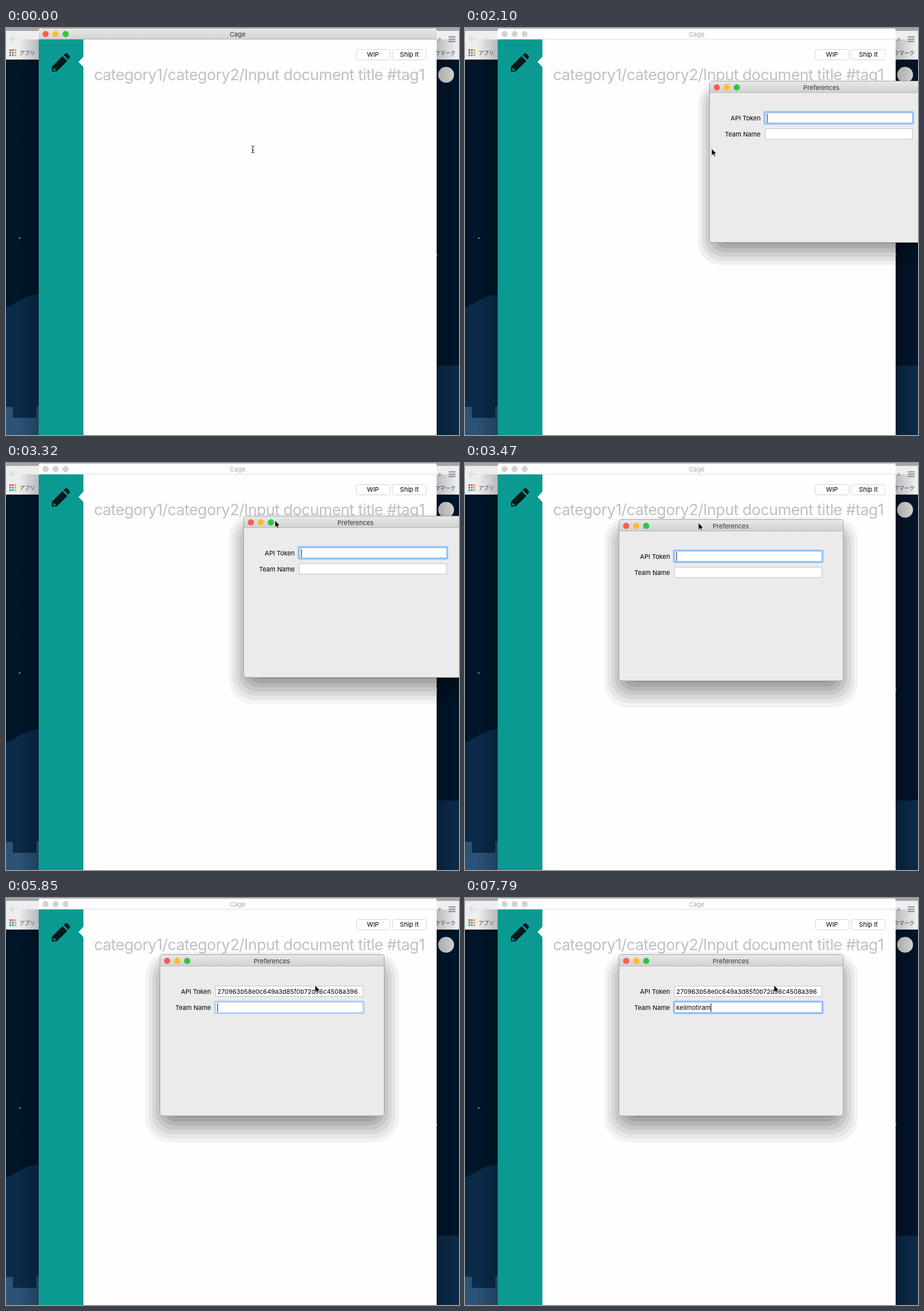
Animation, 790 px wide and 709 px high, one loop 8000 ms. Source, as an HTML page:

```html
<!DOCTYPE html>
<html lang="en">
<head>
<meta charset="utf-8">
<title>Preferences</title>
<style>
  html, body { margin: 0; width: 100%; height: 100%; overflow: hidden; background: #001529; }
  svg { display: block; font: 11px Inter, sans-serif; font-optical-sizing: none; }
  text { white-space: pre; }
  .mid { text-anchor: middle; }
  .end { text-anchor: end; }
  .cjk { font: 9px "Noto Sans CJK JP", "Noto Sans CJK", sans-serif; fill: #444; }
</style>
</head>
<body>
<svg id="stage" width="790" height="709" viewBox="0 0 790 709">
  <defs>
    <linearGradient id="bar" x2="0" y2="1"><stop stop-color="#e8e8e8"/><stop offset="1" stop-color="#d1d1d1"/></linearGradient>
    <linearGradient id="shade"><stop stop-opacity="0"/><stop offset="1" stop-opacity=".22"/></linearGradient>
  </defs>

  <!-- browser behind -->
  <rect width="790" height="709" fill="#001529"/>
  <path d="M0 487C20 479 34 464 57 464V709H0Z" fill="#0a2a48"/>
  <path d="M0 660H12V679H53V659H57V709H0Z" fill="#2b5277"/>
  <path d="M750 588H790V709H750Z" fill="#0a2a48"/>
  <path d="M750 588H790V709H750Z" fill="#0a2a48"/>
  <circle cx="24" cy="366" r="1.2" fill="#a9b4bd"/>
  <circle cx="751" cy="395" r="1.5" fill="#a9b4bd"/>
  <rect width="790" height="55" fill="#eceef0"/>
  <rect width="790" height="5" fill="#a5a5a7"/>
  <g fill="none" stroke="#d9dadc" stroke-width="2">
    <path d="M20 19.5H8M13 14L7.500 19.500L13 25"/>
    <path d="M30 19.500H42M37 14L42.500 19.500L37 25" stroke="#e4e5e7"/>
    <path d="M772 15.500H784M772 19.500H784M772 23.500H784" stroke="#8b8b8d"/>
  </g>
  <g id="apps"></g>
  <text class="cjk" x="23.500" y="46.500">アプリ</text>
  <text class="cjk end" x="784" y="46.500">ブックマーク</text>
  <text x="753" y="23" fill="#8b8b8d">»</text>
  <circle cx="767.500" cy="81.500" r="13.800" fill="#d6d6d6"/>
  <rect x="22" y="20" width="35" height="689" fill="url(#shade)"/>
  <rect x="-786" y="20" width="35" height="689" fill="url(#shade)" transform="scale(-1 1)"/>

  <!-- editor window -->
  <path d="M57 709V5Q57 0 62 0H746Q751 0 751 5V709Z" fill="#fefefe"/>
  <g id="active">
    <path d="M57 20V5Q57 1 61 1H747Q751 1 751 5V20Z" fill="url(#bar)"/>
  </g>
  <path d="M61 .5H747" stroke="#a0a0a2"/>
  <path id="rule" d="M57 19.500H751"/>
  <g id="mainLights"></g>
  <text id="mainTitle" class="mid" x="404" y="15">Cage</text>
  <rect x="57" y="20" width="78" height="689" fill="#0b9a91"/>
  <path d="M135 50V68L126.500 59Z" fill="#fefefe"/>
  <path d="M80 76V67.500L98.500 49L107 57.500L88.500 75.500ZM100.500 47L103.500 44.500Q105.500 43 107.500 45L110.500 48Q112.500 50 111 52L108.500 55Z" fill="#07191c"/>
  <path d="M82.500 70L84.500 69.500V72H87L86.500 74H82.500Z" fill="#0b9a91"/>
  <g fill="#fff" stroke="#d2d2d2">
    <rect x="611" y="37.500" width="59" height="18" rx="3.500"/>
    <rect x="674" y="37.500" width="59" height="18" rx="3.500"/>
  </g>
  <text class="mid" x="640" y="50">WIP</text>
  <text class="mid" x="703.500" y="50">Ship It</text>
  <text x="153.500" y="90.500" fill="#c0c0c0" font-size="27" letter-spacing="-.62">category1/category2/Input document title #tag1</text>
  <rect id="mainCaret" x="157" y="108" width="1" height="23"/>

  <!-- preferences window, in its own coordinates -->
  <g id="prefs">
    <g id="bands"></g>
    <rect x="-.5" y="-.5" width="391" height="281" rx="4.500" fill="#ebebeb" stroke="#a2a2a2"/>
    <path d="M0 19V4Q0 0 4 0H386Q390 0 390 4V19Z" fill="url(#bar)"/>
    <path d="M0 19.500H390" stroke="#b8b8b8"/>
    <g id="prefLights"></g>
    <text class="mid" x="194.500" y="14.500" fill="#333">Preferences</text>
    <text class="end" x="88.500" y="68">API Token</text>
    <text class="end" x="88.500" y="96">Team Name</text>
    <g fill="#fff" stroke="#c4c4c4">
      <rect x="96.500" y="54.500" width="257" height="18"/>
      <rect x="96.500" y="82.500" width="257" height="18"/>
    </g>
    <rect id="ring" x="95.500" width="259" height="20" rx="1.500" fill="none" stroke-width="3.500"/>
    <text id="token" x="99.500" y="68">270963b58e0c649a3d85f0b72d96c4508a396</text>
    <text id="team" x="99.500" y="96"></text>
    <rect id="caret" width="1" height="15"/>
  </g>

  <path id="beam" d="M427.500 205.500Q430.500 205.500 430.500 207.500Q430.500 205.500 433.500 205.500M430.500 207V216M427.500 217.500Q430.500 217.500 430.500 215.500Q430.500 217.500 433.500 217.500M429 212.500H432" fill="none" stroke="#111"/>
  <path id="arrow" d="M0 0V12.500L2.900 9.800L4.800 14L6.800 13.200L5 9H8.800Z" stroke="#fff" stroke-width=".8"/>
</svg>
<script>
const $ = id => document.getElementById(id);
const show = (id, on) => $(id).setAttribute('visibility', on ? 'visible' : 'hidden');
const set = (id, attrs) => { for (const k in attrs) $(id).setAttribute(k, attrs[k]); };
const within = (t, a, b) => t >= a && t < b;
// values of the latest [time, ...values] entry
const latest = (keys, t) => keys.filter(k => k[0] <= t).pop() || keys[0];

const LIGHTS = ['#fc5b52', '#fdbc2e', '#2bc840'];
const lights = (x, y, colors) => colors.map((c, i) =>
  `<circle cx="${x + 17.5 * i}" cy="${y}" r="5.400" fill="${c}"/>`).join('');
const ACTIVE = lights(69, 10.5, LIGHTS);
const INACTIVE = lights(69, 10.5, Array(3).fill('#d3d3d3'));
$('prefLights').innerHTML = lights(12, 10.5, LIGHTS);

$('apps').innerHTML = ['#e5483b', '#e5483b', '#f0a020', '#35a853', '#4285f4', '#f0a020', '#35a853', '#4285f4', '#f0a020']
  .map((c, i) => `<rect x="${6 + i % 3 * 4.4}" y="${37 + (i / 3 | 0) * 4.4}" width="3" height="3" fill="${c}"/>`).join('');

// stepped shadow: each band is smaller and a little stronger
$('bands').innerHTML = Array.from({ length: 7 }, (_, i) => {
  const grow = 26 - 6.1 * i, drop = 21 - 1.2 * i;
  return `<rect x="${-grow}" y="${drop - grow}" width="${390 + 2 * grow}" height="${280 + 2 * grow}"
    rx="${42 - 3.5 * i}" opacity="${.045 + .01 * i}"/>`;
}).join('');

const TEAM = 'kelimotiram';
const WINDOW = [[2100, 427, 93], [3320, 415, 93], [3470, 269, 99]];
const POINTER = [
  [2100, 430, 210], [2550, 452, 188], [2710, 520, 140], [2870, 565, 98],
  [3170, 528, 99], [3320, 469, 100], [3470, 407, 104],
  [5110, 415, 108], [5260, 450, 122], [5410, 500, 140], [5550, 532, 150], [5700, 539, 152]
];

function draw(t) {
  const open = t >= 2100, pasted = t >= 4810, second = t >= 5850;
  show('active', !open);
  show('beam', !open);
  show('mainCaret', within(t, 750, 1350) || within(t, 1950, 2100));
  $('mainLights').innerHTML = open ? INACTIVE : ACTIVE;
  set('mainTitle', { fill: open ? '#a8a8a8' : '#333' });
  set('rule', { stroke: open ? '#dcdcdc' : '#b4b4b4' });

  for (const id of ['prefs', 'arrow']) set(id, { display: open ? 'inline' : 'none' });
  if (!open) return;

  const [, wx, wy] = latest(WINDOW, t), [, px, py] = latest(POINTER, t);
  set('prefs', { transform: `translate(${wx} ${wy})` });
  set('arrow', { transform: `translate(${px} ${py})` });
  $('bands').firstChild.setAttribute('visibility', t < 3320 ? 'hidden' : 'visible');
  set('ring', { y: second ? 81.5 : 53.5, stroke: within(t, 5850, 6000) ? '#b4d1f4' : '#93c1f6' });
  show('token', pasted);

  const step = Math.floor((t - 6750) / 148.5) + 1;
  const typed = Math.max(0, Math.min(TEAM.length, Math.ceil(TEAM.length * step / 8)));
  $('team').textContent = TEAM.slice(0, typed);
  const width = second ? (typed ? $('team').getComputedTextLength() : 0)
    : pasted ? $('token').getComputedTextLength() : 0;
  set('caret', { x: Math.min(351, 99.5 + width), y: second ? 84.5 : 56.5 });
  show('caret', !(within(t, 2550, 3170) || within(t, 3770, 4370) || within(t, 5410, 5850)));
}

function tick() {
  draw(performance.now() % 8000);
  requestAnimationFrame(tick);
}
tick();
</script>
</body>
</html>
```
